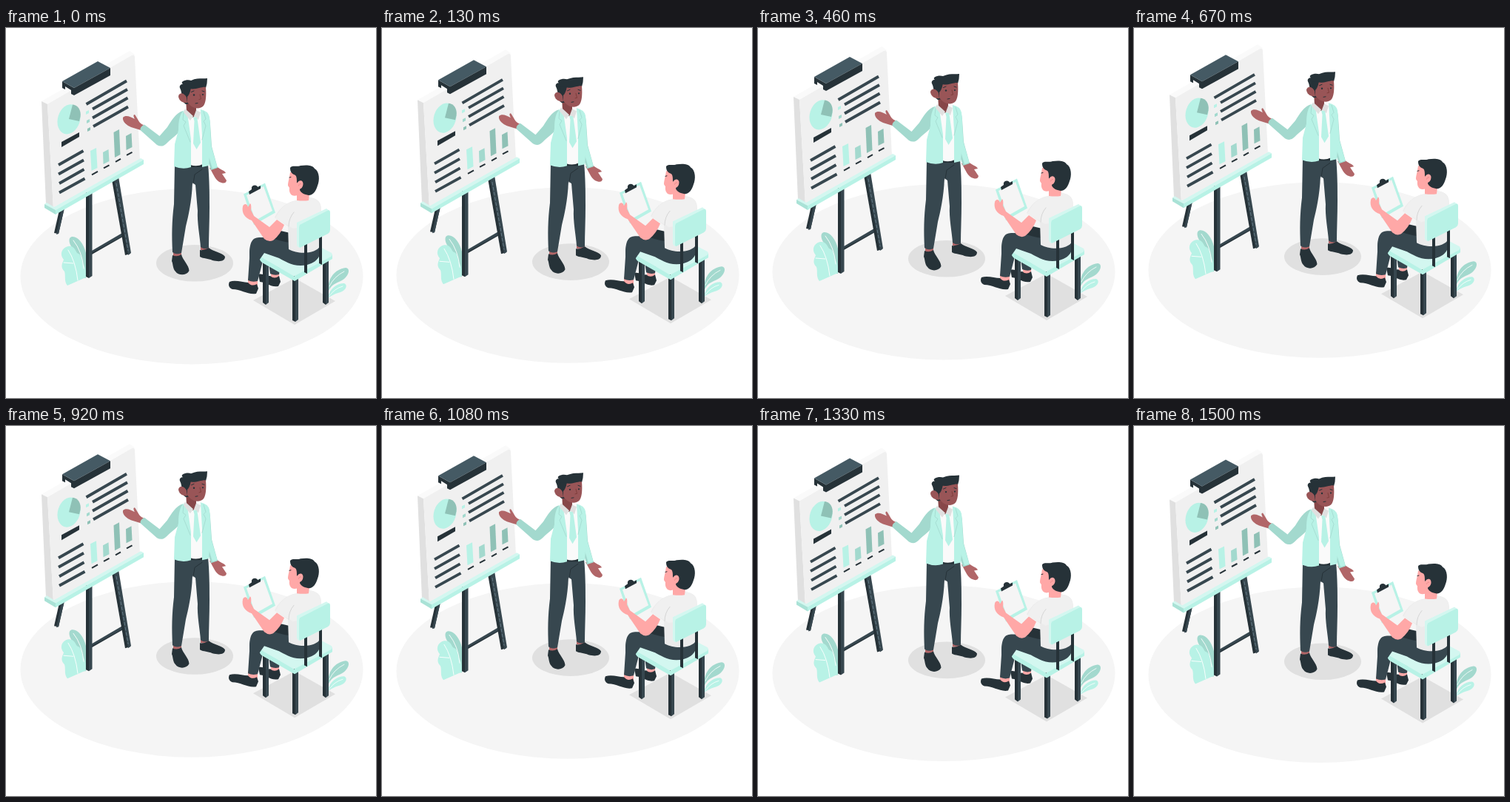
Recreate the animation shown at these times as an HTML page. Size 500 by 500 pixels, loop 1540 ms.

```html
<!DOCTYPE html>
<html lang="en">
<head>
<meta charset="utf-8">
<title>Presentation</title>
<style>
html, body { margin: 0; width: 100%; height: 100%; overflow: hidden; background: #fff; }
svg { display: block; width: 100vw; height: 100vh; }
.mint { fill: #b8f2e6; }
.light { fill: #d3f7f0; }
.sage { fill: #a3d9ce; }
.moss { fill: #8fc1b6; }
.ink { fill: #263238; }
.slate { fill: #37474f; }
.steel { fill: #455a64; }
.pale { fill: #f0f0f0; }
.shade { fill: #e0e0e0; }
.skin { fill: #995557; }
.neck { fill: #874749; }
.hand { fill: #b16668; }
.pink { fill: #ffa8a7; }
.line { fill: none; stroke-linecap: round; stroke-linejoin: round; }
</style>
</head>
<body>
<svg viewBox="0 0 500 500">
<g id="scene">
  <ellipse cx="251" cy="335.7" rx="231.5" ry="118.7" fill="#f5f5f5"/>
  <ellipse class="shade" cx="255" cy="317.8" rx="52" ry="24.8"/>
  <path class="shade" d="M334 368 390 338 445 369 390 401Z"/>

  <!-- plants -->
  <path class="sage" d="M108 338V304C105 291 97 281 89 282 84 283 85 290 88 295 92 302 95 318 99 338Z"/>
  <path class="mint" d="M83 348C78 342 81 335 79 329 73 323 76 318 78 313 72 306 75 297 84 295 91 294 93 299 96 304 104 307 102 315 105 320 109 327 107 333 108 337Z"/>
  <path class="line" stroke="#fff" stroke-width=".9" d="M91 287Q103 302 105 325M84 300Q94 315 97 341M78 317 91 318"/>
  <path class="sage" d="M436 355C434 339 444 326 459 324 466 325 463 334 457 339 449 345 441 344 436 355Z"/>
  <path class="mint" d="M435 365C437 352 447 345 457 345 462 347 460 354 452 357 445 359 441 361 435 365Z"/>
  <path class="line" stroke="#fff" stroke-width=".8" d="M437 349Q443 336 457 329M437 362Q444 352 455 349"/>

  <!-- easel -->
  <path class="ink" d="M72 246 79 243 71 278 65 277Z"/>
  <path class="slate" d="M75 246 79 243 71 278 68 279Z"/>
  <path class="ink" d="M116 303 158 279V282L116 306Z"/>
  <path class="slate" d="M116 301 157 277 158 281 116 304Z"/>
  <path class="ink" d="M143 205 150 201 168 305 161 307Z"/>
  <path class="slate" d="M146 205 152 201 169 304 165 307Z"/>
  <path class="line" stroke="#78909c" stroke-width=".7" stroke-dasharray="4 3" d="M149 210 165 301"/>
  <path class="ink" d="M108 222H112V338L108 336Z"/>
  <path class="slate" d="M112 222H116.500V335L112 338Z"/>
  <path fill="#fafafa" d="M48 99 167 31 174 36 56 104Z"/>
  <path class="shade" d="M48 99 56 103 64 244 54 238Z"/>
  <path class="pale" d="M56 103 170 37Q174 35 174 40L181 179 64 244Z"/>
  <path class="light" d="M52 238 55 236 65 242 182 176 186 178 67 246Z"/>
  <path fill="#a9e2d6" d="M52 238 67 246V252L52 243Z"/>
  <path class="mint" d="M67 246 186 178V184L67 252Z"/>

  <!-- clip -->
  <path class="ink" d="M76 72 92 81V91L88 89V84L80 79V83L76 81Z"/>
  <path class="steel" d="M76 72 124 45 141 54 92 81Z"/>
  <path class="ink" d="M92 81 141 54V64L92 91Z"/>

  <!-- chart sheet -->
  <ellipse class="mint" cx="85" cy="123.300" rx="15" ry="20.500" transform="rotate(17 85 123.300)"/>
  <path class="moss" d="M85 123 90 103.500C97 104 102 111 100.500 120L99 126Z"/>
  <g class="line" stroke="#37474f" stroke-width="3.800" style="stroke-linecap:butt">
    <path d="M108.500 103 163 71.500M117 109.500 164 83M117 121.500 164.500 94.500M118 133 165 106.500"/>
    <path d="M71 185 104.500 166M71 197.500 105 178.500M72 210 105.500 191M72 222.500 106.500 203.500"/>
    <path stroke="#263238" stroke-width="2" d="M116 198.500 124 194M132 189.500 139.500 185.500M148 181 155 177M163 172 170.500 168"/>
  </g>
  <path class="ink" d="M75 154 99 141V147L75 161Z"/>
  <path class="mint" d="M108 113 112 111V115L108 117Z"/>
  <path class="sage" d="M109 125 113 123V127L109 129Z"/>
  <path class="moss" d="M110 136 114 134V138L110 140Z"/>
  <path class="mint" d="M114 166 122 162 123.500 189 115.500 193Z"/>
  <path class="sage" d="M131 168 138.500 164 139.500 180 131.500 184Z"/>
  <path class="moss" d="M145.500 141 153 137 154.500 171 147 175Z"/>
  <path class="moss" d="M162 146 169.500 142 170.500 161 162.500 165Z"/>

  <!-- presenter -->
  <path class="hand" d="M275 189 284 186C287 191 296 192 297 196L292 197 298 206Q297 211 291 209C283 207 281 198 275 189Z"/>
  <path class="sage" d="M268 113Q275 115 276 130L278 160 286 189 277 192 268 165Z"/>
  <path class="mint" d="M269 114Q275 116 275.500 130L277.500 160 285.500 188 279 190 270 160Z"/>
  <path class="hand" d="M226 300H237V310H226ZM263 292H274V300H263Z"/>
  <path class="ink" d="M225 307Q231 310 237 306C239 314 247 320 247.500 328 244 335 233 335 229 329 225 325 226 319 224 315ZM262 300Q268 301 274 297C281 303 292 303 296 309 296 316 287 316 279 314 273 311 267 312 262 309Z"/>
  <path class="slate" d="M228 184H273C275 205 275 225 275 242 275 262 274 280 274 297Q268 300 263 296C262 282 258 262 259 247L256 212 252 209C251 235 246 256 243 268L237 304Q230 307 225 303C224 280 224 262 227 238Z"/>
  <path class="line" stroke="#263238" stroke-width="1" d="M253 210 255 198 265 191"/>
  <path class="ink" d="M250 183H266V188H250Z"/>
  <path fill="#fafafa" d="M240 112 262 109 269 118 266 184Q258 188 249 185Z"/>
  <path class="hand" d="M186 131C180 130 178 122 174 117 171 117 173 121 174 123 168 120 162 117 158 121 157 127 164 132 169 134L182 138Z"/>
  <path class="sage" d="M239 112C230 114 223 126 218 134L207.500 146 187 130.500Q181 133 181.500 138L204 158Q211 162 217 156C226 147 234 143 238 134Z"/>
  <path class="mint" d="M241 111C235 115 233 125 233 138L228 157 227 187Q239 192 250 188V150L245 115ZM263 110Q273 112 275 120C277 141 276 164 274 186L265 188 265 145Z"/>
  <path class="line" stroke="#a3d9ce" stroke-width=".8" d="M240 114 239 124 243 127 240 132 249 154M267 113 270 123 267 126 270 132 265 151"/>
  <path class="neck" d="M243 95 257 102 257 116 253 121 244 113Z"/>
  <path class="shade" d="M242 109 253 119 249 125 240 114ZM257 111 254 119 260 124 263 114Z"/>
  <path class="mint" d="M253 120 258 121 259 126 263 155 257.500 164 253 156 254.500 126Z"/>
  <path class="ink" d="M243 103C236 99 239 88 235 81 234 78 236 76 239 76 234 72 245 69 250 71 259 67 266 69 272 68L271.500 75 270 81 250 102Z"/>
  <path class="skin" d="M245 92C248 89 247 85 248 82 256 84 265 79 270 80 271 92 270 103 266 106 260 111 250 108 245 100Z"/>
  <path class="skin" d="M245 101C238 102 233 97 233 92 235 86 242 88 244 94Z"/>
  <path class="ink" d="M242 81H250Q248 91 244.500 93L240 89Z"/>
  <g class="line" stroke="#263238" stroke-width="1">
    <path d="M250.500 86.500 254 85M265 85 268 86M256 102 259 101.500"/>
    <path stroke="#7f3e3b" d="M262 90 263.500 96 261 96.500"/>
  </g>
  <circle class="ink" cx="254" cy="90.500" r="1.200"/><circle class="ink" cx="266" cy="90" r="1.100"/>

  <!-- listener's lower legs -->
  <path class="pink" d="M327 338H340V351H327ZM358 326H369V342H358Z"/>
  <path class="ink" d="M302 343C310 340 320 344 327 344Q332 350 339 346L341 352 338 359C327 361 318 353 306 353 301 351 300 347 302 343ZM341 333C347 331 352 336 357 335Q363 340 369 335L371 343 368 349C358 351 353 344 343 343Z"/>
  <path class="slate" d="M354 311H372L369 333Q363 335 357 332ZM330 296 351 300 340 342Q333 344 327 341Z"/>

  <!-- chair base -->
  <path class="ink" d="M347 314H351V374L347 371ZM387 335H391V397L387 395ZM428 314H432V374L428 371Z"/>
  <path class="slate" d="M351 314H355V371L351 374ZM391 335H395V394L391 397ZM432 312H436V371L432 374Z"/>
  <path class="mint" d="M390 333 441 306V312L390 342Z"/>
  <path class="light" d="M343 306 392 279 440 304Q442 307 439 309L392 334Q390 335 387 334L343 310Q341 308 343 306Z"/>
  <path class="mint" d="M342 308 387 334Q390 335 390 336V342L346 317Q342 314 342 308Z"/>

  <!-- listener -->
  <path class="slate" d="M329 303C330 288 333 283 344 283L380 284 424 287C427 306 424 315 407 320 389 324 377 315 369 311L349 304 342 314 329 315Z"/>
  <path class="ink" d="M361 280 371 274 384 277V290Q370 288 361 284Z"/>
  <path fill="#ebebeb" d="M392 233 410 229C421 230 426 235 426 246L425 294C419 306 394 306 382 299L381 268 363 256C369 244 379 235 392 233Z"/>
  <path class="pale" d="M390 234 409 229Q424 230 426 244L425 264 388 271 364 257C370 244 380 235 390 234Z"/>
  <path class="line" stroke="#d5d5d5" stroke-width="1" d="M389 249Q382 257 382 268"/>
  <path class="pink" d="M393 218 411 216 409 233Q402 234 393 233Z"/>
  <path class="pink" d="M384 195C383 203 381 208 381 213L383 216C382 223 386 229 394 226L404 214 398 194Z"/>
  <path class="ink" d="M384 189C386 185 392 188 398 186 406 185 414 185 417 190 424 194 424 206 421 213 419 220 415 226 409 226 403 225 399 223 397 219L398 212 393 209C393 203 393 199 389 198 385 196 384 193 384 189Z"/>
  <ellipse class="pink" cx="397" cy="212" rx="4.300" ry="6" transform="rotate(20 397 212)"/>
  <path class="line" stroke="#e48585" stroke-width=".8" d="M395.500 213Q397 209 399 211"/>
  <path class="line" stroke="#263238" stroke-width="1" d="M383 202 385 201.500"/>

  <!-- clipboard and arm -->
  <path class="mint" d="M321 224.500 350 209.500 364 249.500 335 266Z"/>
  <path fill="#f5f5f5" d="M325 226 348 214 360 247 337 260Z"/>
  <path class="ink" d="M328 221 332 218Q331 213 336 212.500 340 213 340 215L344 213V217L329 225Z"/>
  <path class="pink" d="M320 241C322 236 326 238 327 242L330 237Q332 239 331 246L335 254 356 269 366 259 376 266Q371 279 361 287 355 290 349 285L332 260C323 257 318 250 320 241Z"/>

  <!-- chair back -->
  <path class="ink" d="M403 290H407V332L403 330ZM423 281H427V320L423 318Z"/>
  <path class="light" d="M393 263 433 244 437 247 398 267 397 297Q393 296 393 292Z"/>
  <path class="mint" d="M397 266 434 247Q438 245 438 249V273Q438 276 435 278L399 296Q396 298 396 294V269Z"/>
</g>
</svg>
<script>
const PERIOD = 1540, LEAD = 50, LIFT = 10;
const scene = document.getElementById('scene');

// The whole scene floats up and down at constant speed.
function draw(now) {
  const phase = (now + LEAD) / PERIOD % 1;
  const rise = LIFT * (1 - Math.abs(2 * phase - 1));
  scene.setAttribute('transform', `translate(0 ${(0.65 - rise).toFixed(3)})`);
}

const start = performance.now();
function tick() {
  draw(performance.now() - start);
  requestAnimationFrame(tick);
}
tick();
</script>
</body>
</html>
```
